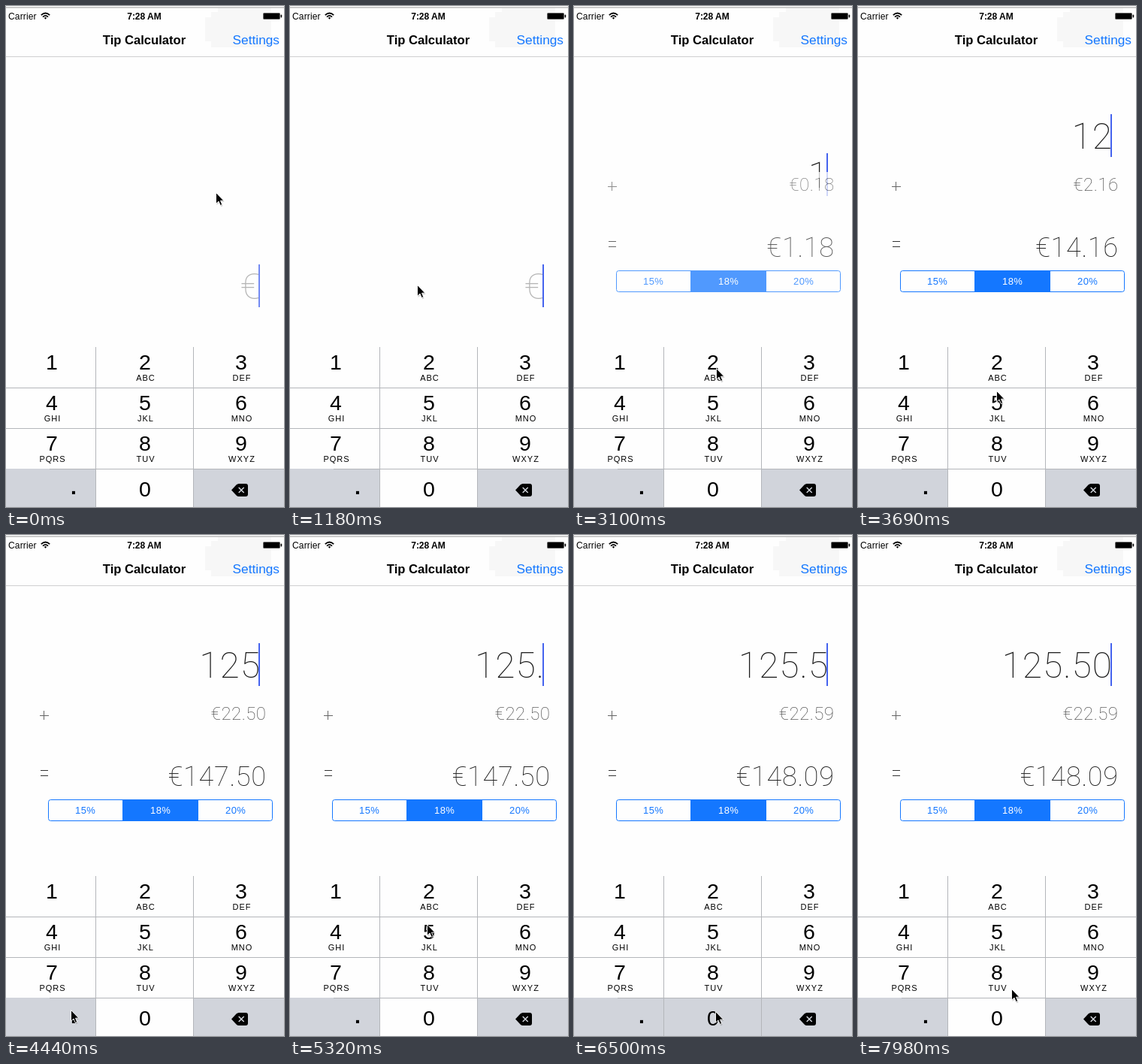
Recreate the animation shown at these times as an HTML page. Size 370 px wide and 667 px high, loop 8 s.

```html
<!DOCTYPE html>
<html lang="en">
<head>
<meta charset="utf-8">
<title>Tip Calculator</title>
<style>
html, body { margin: 0; width: 100%; height: 100%; overflow: hidden; background: #fefefe; }
svg { display: block; width: 370px; height: 667px; font-family: "Liberation Sans", Arial, sans-serif; }
.mid { text-anchor: middle; }
.end { text-anchor: end; }
.bold { font-weight: 700; }
.thin { font-family: Roboto, "Lato", sans-serif; font-weight: 100; letter-spacing: .02em; text-anchor: end; }
.digit { font-size: 28.5px; text-anchor: middle; }
.abc { font-size: 11px; letter-spacing: 1px; text-anchor: middle; }
.seg { font-size: 13px; letter-spacing: .4px; text-anchor: middle; fill: #1477ff; }
.rule { stroke: #b4b6ba; fill: none; }
</style>
</head>
<body>
<svg viewBox="0 0 370 667">
  <!-- status and title bars -->
  <path d="M282 3H353V55H273V47H265V15H273V8H282Z" fill="#f7f7f7"/>
  <rect y="1" width="370" height="2" fill="#cbcbcb"/>
  <path d="M0 67.5H370" stroke="#cfcfd0"/>
  <text x="3" y="18" font-size="12" letter-spacing=".15">Carrier</text>
  <g fill="none" stroke="#000" stroke-width="1.7">
    <path d="M46.8 12.2Q52.5 6.8 58.2 12.2M49 14.6Q52.5 11.3 56 14.6"/>
    <path d="M50.8 15.8Q52.5 14.4 54.2 15.8L52.5 17.8Z" fill="#000" stroke="none"/>
  </g>
  <text class="mid bold" x="184" y="18" font-size="12">7:28 AM</text>
  <rect x="342.5" y="9.5" width="22" height="8" rx="1" stroke="#666"/>
  <rect x="365.6" y="11.5" width="1.6" height="4" rx=".8"/>
  <text class="mid bold" x="184" y="51" font-size="16.6">Tip Calculator</text>
  <text class="end" x="364" y="51" font-size="17.3" fill="#1477ff">Settings</text>

  <!-- bill field -->
  <g id="field">
    <text id="bill" class="thin" x="339" y="46" font-size="48"></text>
    <rect id="caret" x="336" y="0" width="2" height="57" fill="#4563ee"/>
  </g>

  <!-- tip panel -->
  <g id="panel">
    <rect y="221" width="370" height="233" fill="#fefefe"/>
    <path d="M45 240.5H57M50.5 234V246" stroke="#666"/>
    <path d="M46 313.5H56M46 320.5H56" stroke="#333"/>
    <text id="tip" class="thin" x="346.5" y="246" font-size="24" fill="#444"></text>
    <text id="total" class="thin" x="346.7" y="334" font-size="36" fill="#222"></text>
    <rect x="56.5" y="352.5" width="298" height="28" rx="3" fill="none" stroke="#1477ff"/>
    <rect x="155" y="352" width="101" height="29" fill="#1477ff"/>
    <text class="seg" x="105.7" y="371">15%</text>
    <text class="seg" x="205.7" y="371" style="fill:#fff">18%</text>
    <text class="seg" x="305.7" y="371">20%</text>
  </g>

  <!-- keypad -->
  <path d="M0 616H119V667H0ZM250 616H370V667H250Z" fill="#d1d4db"/>
  <rect id="press"/>
  <path class="rule" d="M119.5 454V667M249.5 454V667M0 508.5H370M0 562.5H370M58 616.5H370"/>
  <g id="keys"></g>
  <text class="digit bold" x="90" y="650">.</text>
  <path d="M300 644.5L306.5 637.6Q308 636 310 636H319Q322 636 322 639V650Q322 653 319 653H310Q308 653 306.5 651.4Z"/>
  <path d="M309.7 641L316.7 648M316.7 641L309.7 648" stroke="#d1d4db" stroke-width="1.5"/>

  <g id="mouse">
    <path d="M1.5 2.5V17L5 14L7.2 19.2L9.6 18.2L7.4 13H11.7Z" opacity=".16"/>
    <path d="M.5 .5V15.2L4 12L6.2 17.4L8.7 16.4L6.5 11.2H10.8Z" stroke="#fff" stroke-width=".9"/>
  </g>
</svg>
<script>
const LOOP = 8000, TICK = 147.8;
const el = id => document.getElementById(id);
const [field, bill, caret, panel, tip, total, press, mouse] =
  ["field", "bill", "caret", "panel", "tip", "total", "press", "mouse"].map(el);

const letters = ["", "ABC", "DEF", "GHI", "JKL", "MNO", "PQRS", "TUV", "WXYZ"];
const colX = [61, 185, 313];
el("keys").innerHTML = letters.map((abc, i) => {
  const x = colX[i % 3], y = 484 + 54 * Math.floor(i / 3);
  return `<text class="digit" x="${x}" y="${y}">${i + 1}</text>` +
    `<text class="abc" x="${x + 1}" y="${y + 15}">${abc}</text>`;
}).join("") + '<text class="digit" x="185" y="653">0</text>';

// pointer stops: tick, x, y
const path = [
  [3, 279, 248], [7, 190, 350], [11, 58, 482], [13, 55, 489], [15, 58, 481], [18, 58, 481],
  [21, 189, 482], [23, 189, 482], [24, 185, 506], [26, 183, 518], [28, 183, 518],
  [30, 86, 632], [33, 86, 632], [36, 182, 518], [40, 183, 519], [43, 188, 634],
  [53, 188, 634], [54, 204, 604]
];
// entries: tick, bill text, tip, total
const entries = [
  [0, "€", "", ""], [19, "1", "€0.18", "€1.18"], [23, "12", "€2.16", "€14.16"],
  [28, "125", "€22.50", "€147.50"], [33, "125.", "€22.50", "€147.50"],
  [40, "125.5", "€22.59", "€148.09"], [45, "125.50", "€22.59", "€148.09"]
];
// key presses: from tick, to tick, x, y, width, height, colour
const grey = "#d1d4db";
const presses = [
  [17, 19, 0, 454, 119, 54, grey], [22, 23, 120, 454, 129, 54, grey],
  [26, 28, 120, 509, 129, 53, grey], [31, 33, 58, 617, 61, 50, "#fefefe"],
  [38, 40, 120, 509, 129, 53, grey], [44, 45, 120, 617, 129, 50, grey]
];
// caret opacity from each tick on
const blink = [
  [0, .75], [1, 1], [4, .5], [5, 0], [8, 1], [11, .5], [12, 0], [15, 1],
  [48, .5], [49, 0], [52, 1]
];

const last = (list, k) => list.filter(e => e[0] <= k).pop();
const set = (node, attrs) => { for (const a in attrs) node.setAttribute(a, attrs[a]); };
const ease = p => p * p * (3 - 2 * p);
const clamp = p => Math.min(1, Math.max(0, p));

function pointer(k) {
  const i = path.findIndex(p => p[0] >= k);
  if (i < 1) return path[i < 0 ? path.length - 1 : 0].slice(1);
  const [a, b] = [path[i - 1], path[i]];
  const p = ease((k - a[0]) / (b[0] - a[0]));
  return [1, 2].map(n => a[n] + (b[n] - a[n]) * p);
}

function draw(t) {
  const k = Math.floor((t + 12) / TICK); // screen refreshes once per tick
  const [, text, tipText, totalText] = last(entries, k);
  bill.textContent = text;
  tip.textContent = tipText;
  total.textContent = totalText;
  bill.setAttribute("fill", k < 19 ? "#b4b4b4" : "#1a1a1a");

  const show = ease(clamp((k - 19) / 3));
  field.setAttribute("transform", `translate(0 ${Math.round(344 - 200 * show)})`);
  panel.setAttribute("opacity", show);
  caret.setAttribute("opacity", last(blink, k)[1]);

  const hit = presses.find(p => k >= p[0] && k < p[1]);
  if (hit) {
    const [, , x, y, width, height, fill] = hit;
    set(press, { x, y, width, height, fill });
  } else set(press, { width: 0, height: 0 });

  mouse.setAttribute("transform", `translate(${pointer(k).map(Math.round).join(" ")})`);
}

const start = performance.now();
function frame() {
  draw((performance.now() - start) % LOOP);
  requestAnimationFrame(frame);
}
frame();
</script>
</body>
</html>
```
